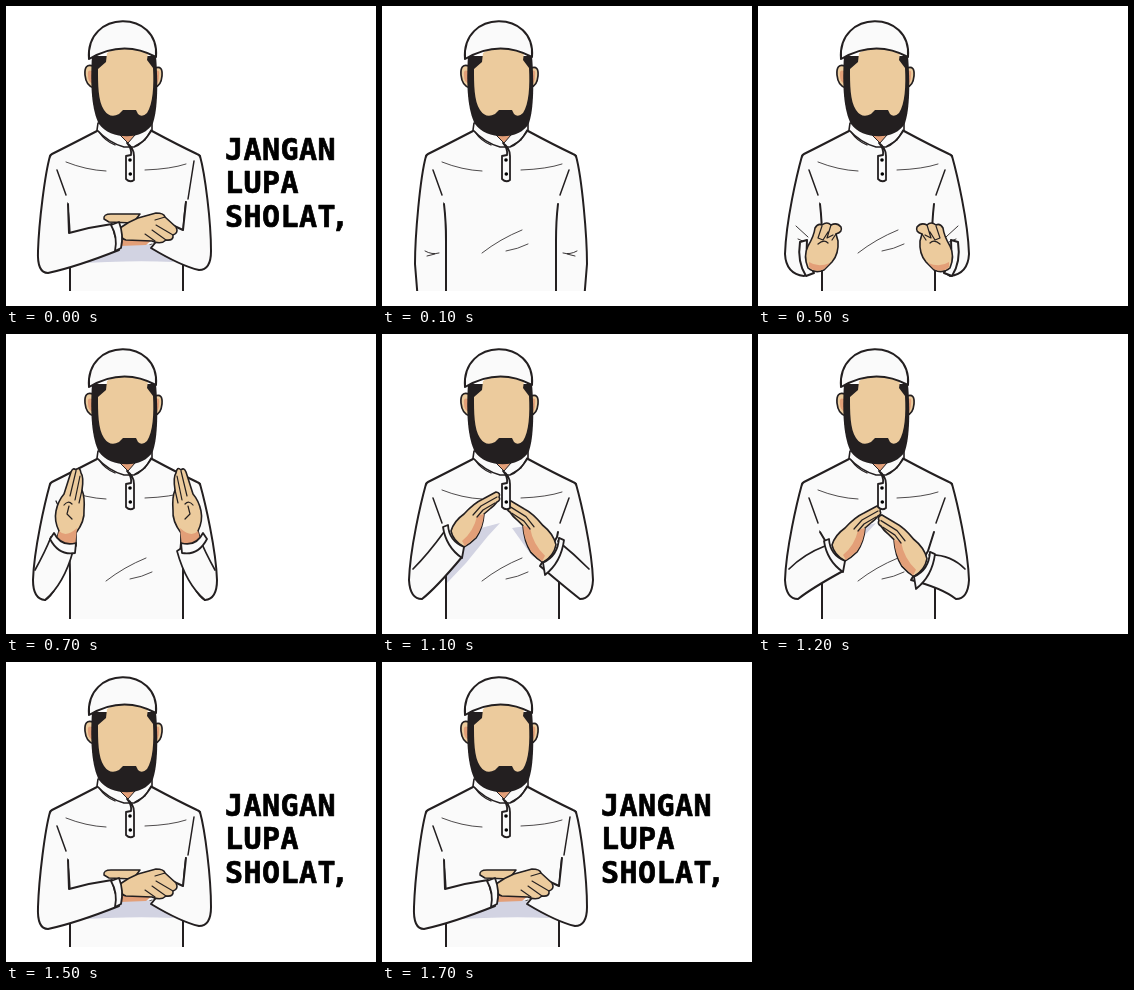
These frames come from a looping animation (370 px wide and 300 px high, 2 s). An HTML page:

```html
<!DOCTYPE html>
<html lang="id">
<head>
<meta charset="utf-8">
<style>
  html, body { margin: 0; width: 100%; height: 100%; overflow: hidden; background: #fff; }
  svg { display: block; width: 370px; height: 300px; }
  text { font: bold 30px "DejaVu Sans Mono", monospace; letter-spacing: .45px; stroke: #000; stroke-width: .7px; stroke-linejoin: round; }
</style>
</head>
<body>
<svg id="stage" viewBox="0 0 370 300"></svg>
<script>
const INK = '#231f20', CLOTH = '#fafafa', SKIN = '#eccb9d', BLUSH = '#e39f78', SHADE = '#d2d3e2';

// Open paths are filled across the gap but only stroked along the drawn part.
const shape = (d, fill = CLOTH, w = 2) =>
  `<path d="${d}" fill="${fill}" stroke="${INK}" stroke-width="${w}" stroke-linejoin="round" stroke-linecap="round"/>`;
const line = (d, w = 1.3) => shape(d, 'none', w);
const fill = (d, color) => `<path d="${d}" fill="${color}"/>`;
const move = (x, y, art) => `<g transform="translate(${x} ${y})">${art}</g>`;
const flip = (art, sum = 238) => `<g transform="matrix(-1 0 0 1 ${sum} 0)">${art}</g>`;
const both = (art, sum) => art + flip(art, sum);

const torso =
  fill('M90 125Q60 141 44 150L62 198L65 285H177L177 230L180 198L194 150Q170 141 146 125Z', CLOTH) +
  line('M91 125Q64 139 46 148Q44 149 44 151M146 125Q172 139 191 148Q194 149 194 151', 2) +
  line('M61 197Q64 220 64 240V285M180 196Q177 220 177 240V285', 2) +
  line('M60 156Q80 164 100 165M180 158Q165 163 139 164M100 247Q118 233 140 224M124 245Q136 243 146 238', .8);

const head =
  shape('M92 117L91 124Q103 137 118 141L128 141Q137 138 146 124L146 117Z', CLOTH, 1.6) +
  shape('M114 129L122 137L129 129Z', BLUSH, 1) +
  shape('M121 137Q126 143 125 149L120 150V173Q124 177 128 174V150Q128 142 121 137', CLOTH, 1.8) +
  line('M129 140L139 134L145 124M109 139Q99 135 93 126', 1.3) +
  '<circle cx="124" cy="154" r="1.8"/><circle cx="124.3" cy="168" r="1.8"/>' +
  shape('M87 60Q78 57 79 69Q80 80 88 82Z', SKIN, 1.7) +
  shape('M149 62Q157 59 156 70Q155 80 149 81Z', SKIN, 1.7) +
  fill('M86 65Q81 63 82 70Q82 76 87 78ZM150 65Q154 63 153 70Q153 76 150 78Z', BLUSH) +
  fill('M86 50C84 80 86 105 93 118C104 134 138 135 147 117C152 102 152 75 150 50Z', INK) +
  fill('M101 47C112 40 132 40 142 47L141 54L147 62C148 80 147 98 141 107Q136 112 132 108L130 104H117L113 108Q104 113 98 104C92 95 92 78 92 63L100 56Z', SKIN) +
  shape('M83 53C79 3 154 3 150 51Q117 33 83 53Z');

const seam = line('M51 164L60 189', 1.5);

// Arms hanging; inset pulls the sleeves towards the body.
const hang = inset => both(
  shape(`M44 150C38 172 ${30 + inset} 230 ${30 + inset} 258L${33 + inset} 295H64V235Q64 215 62 198`) + seam +
  line('M43 245Q50 249 57 247M45 250L53 248', .9));

const curledHand =
  shape('M42 236Q39 256 48 270L56 267Q47 252 49 234Z') +
  shape('M50 262Q45 250 50 240Q56 230 57 222Q60 217 64 219Q69 215 73 219Q79 216 83 221Q85 226 78 228L80 235Q81 248 74 256L66 264Q57 268 50 262Z', SKIN, 1.6) +
  fill('M51 256Q60 262 72 257L66 263Q57 267 51 261Z', BLUSH) +
  line('M64 220L60 232L65 234L70 226M73 219L69 232L75 229M78 228L74 234M60 238Q66 233 70 237', 1.2);

const lift = dy => both(
  shape(`M44 150C39 168 28 215 27 248Q28 ${268 + dy / 2} 46 ${270 + dy / 2}L64 ${258 + dy}V235Q64 215 62 198`) + seam +
  line('M38 220L50 231M40 233L47 236', .9)) + both(move(0, dy, curledHand), 242);

const openHand =
  shape('M50 208L53 197Q48 187 50 177Q52 167 58 160L65 138Q67 133 70 136Q74 132 75 139Q78 143 76 156Q79 163 78 176Q79 187 70 199V212Q58 216 50 208Z', SKIN, 1.6) +
  fill('M53 197Q60 204 71 194L69 212Q58 215 50 208Z', BLUSH) +
  line('M70 137L64 162M74 142L69 166M76 156L73 169M58 171Q62 166 66 170M63 172L61 180L66 185', 1.2) +
  shape('M48 199Q55 213 70 209L69 219Q53 222 44 205Z', CLOTH, 1.8);

const raise = dy => both(
  shape(`M44 150C39 168 28 215 27 246Q27 265 39 266Q49 262 64 ${220 + dy / 2}L62 198`) +
  shape(`M29 236Q39 218 45 ${203 + dy}L67 ${217 + dy}Q58 250 39 266`, CLOTH, 1.7) +
  line('M50 167L56 180', 1.3)) + both(move(0, dy, openHand), 245);

const slantHand =
  shape('M69 197Q72 187 82 180Q92 169 101 165L114 158Q119 159 117 163Q119 166 115 168Q112 172 109 174L102 180Q101 194 94 204Q88 210 82 213Q71 207 69 197Z', SKIN, 1.6) +
  fill('M102 180Q101 193 94 203L83 212L80 207Q92 197 95 182Z', BLUSH) +
  line('M115 163L99 172L91 181M113 169L101 176L95 183', 1.2) +
  shape('M66 191Q67 207 82 213L80 224Q64 213 61 193Z', CLOTH, 1.8);

const bentSleeve = (dx, dy) =>
  shape(`M44 150C39 168 28 215 27 246Q28 265 40 265Q54 254 ${80 + dx} ${223 + dy}L${63 + dx} ${194 + dy}L62 198`) +
  line(`M31 235Q46 220 ${62 + dx} ${198 + dy}`, 1.7) + seam;

const fold = (dx, dy) =>
  fill('M82 214L99 194L118 189L106 202L84 229L65 249V240ZM130 194L144 192L158 215L172 232L150 222Z', SHADE) +
  bentSleeve(dx, dy) + flip(bentSleeve(dx, dy + 9)) +
  move(dx, dy, slantHand) +
  `<g transform="matrix(-1 0 0 1.12 ${243 - dx} ${dy - 10})">${slantHand}</g>`;

const lapShade = fill('M66 258L112 240L128 233L146 240L168 256Q120 254 66 258Z', SHADE);

const clasp = lapShade +
  both(shape('M44 150C39 168 32 215 31 245Q31 263 42 263Q65 259 109 238L94 211Q80 217 50 230L62 224V198') + seam) +
  fill('M63 200L64 222L50 229L48 180Z', CLOTH) +
  shape('M94 204Q92 198 100 197L122 194L110 207Z', SKIN, 1.5) +
  shape('M112 233L146 209Q151 216 146 224L140 229Z', BLUSH, 1.5) +
  shape('M140 221L144 239L150 238L146 215Z', CLOTH, 1.7) +
  shape('M97 211L112 200Q122 194 134 193L148 191Q161 192 160 197Q164 200 160 203Q160 209 150 211Q140 213 134 217Q122 229 109 236Z', SKIN, 1.6) +
  line('M160 197L138 199M160 203L138 205M150 211L138 210', 1.1) +
  shape('M91 213L97 210Q105 221 109 236L103 239Q100 223 91 213Z', CLOTH, 1.8);

const rest = lapShade +
  shape('M194 150C199 168 205 215 205 245Q205 264 193 264Q175 260 145 242L164 218L177 224L180 196') +
  line('M188 155L182 193', 1.5) +
  shape('M44 150C39 168 33 215 32 245Q31 267 42 267Q70 261 113 244L106 218Q84 221 63 227L62 198') + seam +
  shape('M98 213Q97 208 105 208L134 208L127 217L103 216Z', SKIN, 1.5) +
  fill('M116 230L146 234L140 239L114 240Z', BLUSH) +
  shape('M114 222Q122 216 132 212L150 207Q158 207 159 211L170 221Q173 227 167 229Q168 235 160 234Q155 239 146 235L120 234Q114 233 114 222Z', SKIN, 1.6) +
  line('M167 229L150 219M160 234L146 224M149 235L139 228M159 211L149 214', 1.1) +
  shape('M105 219L113 216Q118 229 115 242L109 245Q112 231 105 219Z', CLOTH, 1.8);

const caption = (scale, x = 280, y = 177.5) =>
  `<g transform="translate(${x} ${y}) scale(${scale})">` +
  ['JANGAN', 'LUPA', 'SHOLAT<tspan dx="-5">,</tspan>']
    .map((word, i) => `<text x="-61" y="${-24 + i * 33.5}">${word}</text>`).join('') + '</g>';

// [start ms, arms, caption]
const steps = [
  [0, rest, caption(1)],
  [100, hang(3), ''],
  [300, hang(0), ''],
  [400, lift(26), ''],
  [500, lift(0), ''],
  [600, raise(24), ''],
  [700, raise(0), ''],
  [1100, fold(0, 0), ''],
  [1200, fold(5, 14), ''],
  [1300, clasp, caption(.68, 282, 169)],
  [1400, rest, caption(.84, 281, 173)],
  [1500, rest, caption(1)],
  [1600, rest, caption(1.1, 279.5, 178)],
  [1700, rest, caption(1)]
];

const stage = document.getElementById('stage');
stage.innerHTML = '<clipPath id="hem"><path d="M0 0H370V285H0Z"/></clipPath>' +
  steps.map(([, arms, words]) =>
    `<g class="step" display="none"><g clip-path="url(#hem)">${torso}${arms}${head}</g>${words}</g>`).join('');
const groups = [...stage.querySelectorAll('.step')];
const begin = performance.now();
let shown = -1;

function draw(now) {
  const t = Math.max(0, now - begin) % 2000;
  const current = steps.findLastIndex(([start]) => start <= t);
  if (current !== shown) {
    groups.forEach((g, i) => g.setAttribute('display', i === current ? 'inline' : 'none'));
    shown = current;
  }
  requestAnimationFrame(draw);
}
draw(begin);
</script>
</body>
</html>
```
